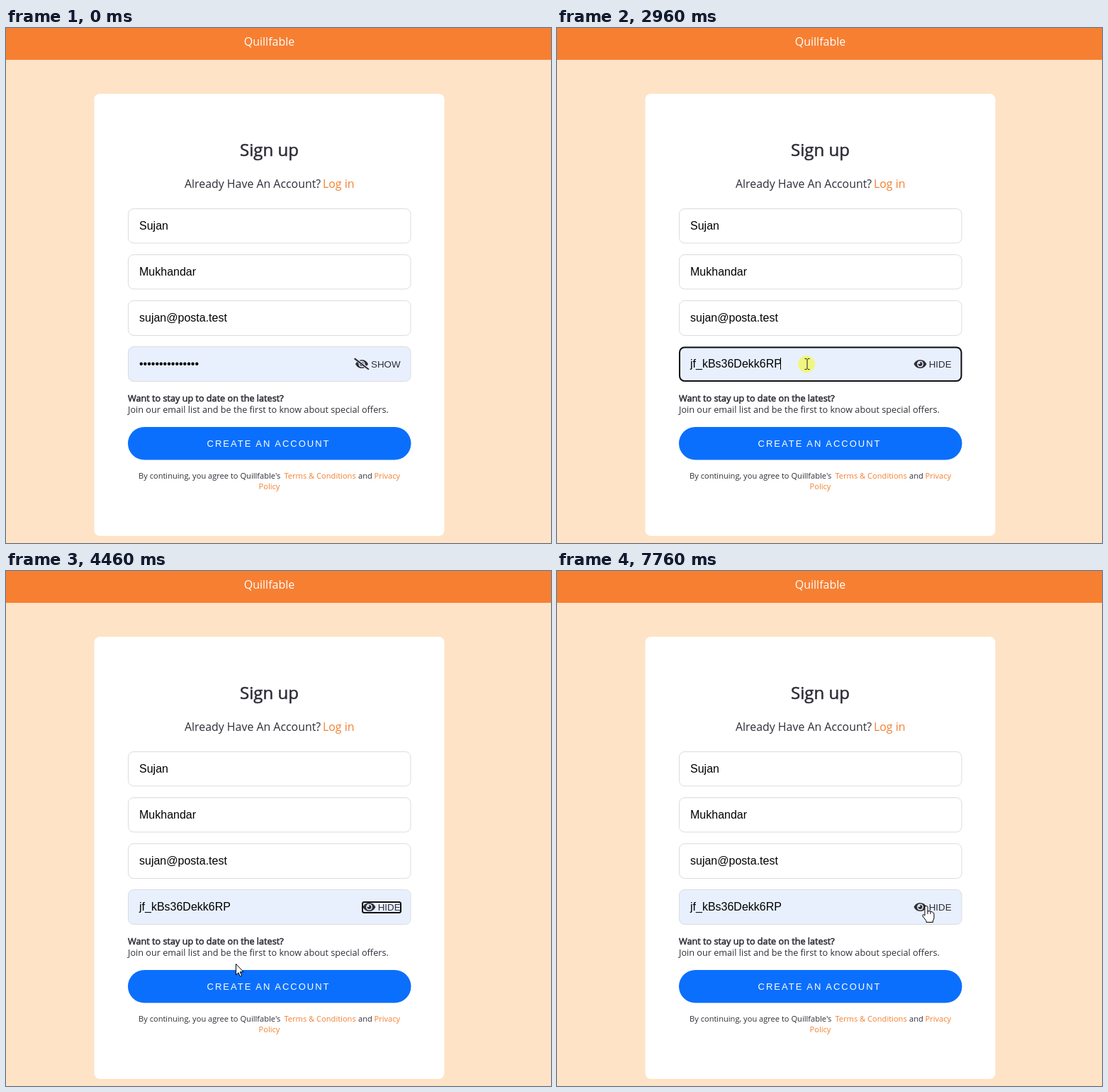
Write an HTML page that moves like this. It is 769 px wide and 728 px high and loops after 8 s.

```html
<!DOCTYPE html>
<html lang="en">
<head>
<meta charset="utf-8">
<title>Sign up</title>
<style>
  html, body { margin: 0; height: 100%; overflow: hidden; background: #fee3c6; }
  svg { display: block; width: 769px; height: 728px; font: 16px "Open Sans", sans-serif; fill: #2f2d36; }
  text { white-space: pre; }
  .mid { text-anchor: middle; }
  .ui { font-family: "Liberation Sans", Arial, sans-serif; }
  .field { fill: #fff; stroke: #dcdcdf; }
  .filled { fill: #e8f0fe; }
  .value { fill: #000; }
  .link { fill: #f28030; }
  .heavy { stroke: #2f2d36; stroke-width: .55; }
  .note { font-size: 12.67px; }
  .terms { font-size: 11.1px; }
  .toggle { font-size: 13.33px; }
  .ring { fill: none; stroke: #101014; stroke-width: 2; }
  .popup { fill: #fff; font-size: 11.1px; }
  .line { fill: none; stroke: #eee; stroke-width: 1.2; }
  .pointer { fill: #fff; stroke: #000; stroke-linejoin: round; }
</style>
</head>
<body>
<svg viewBox="0 0 769 728">
  <defs>
    <g id="eye">
      <path d="M0 8Q3 2 9 2T18 8Q15 14 9 14T0 8Z"/>
      <circle cx="9" cy="8" r="4.5" fill="#e8f0fe"/>
      <circle cx="9" cy="8" r="3"/>
      <circle cx="7.5" cy="6.5" r="1.5" fill="#e8f0fe"/>
    </g>
    <filter id="shade" x="-10%" y="-10%" width="120%" height="130%">
      <feDropShadow dx="0" dy="5" stdDeviation="5" flood-opacity=".28"/>
    </filter>
  </defs>

  <rect width="769" height="728" fill="#fee3c6"/>
  <rect width="769" height="45" fill="#f77f32"/>
  <text class="mid" x="371.5" y="24.5" fill="#fff">Quillfable</text>
  <rect x="124.5" y="93" width="494" height="625" rx="8" fill="#fff"/>

  <text class="mid heavy" x="371.5" y="181" font-size="24">Sign up</text>
  <text x="252" y="226" font-size="15.9">Already Have An Account?</text>
  <text class="link" x="447" y="226" font-size="15.9">Log in</text>

  <rect class="field" x="172.5" y="255.5" width="398.5" height="48.5" rx="7.5"/>
  <rect class="field" x="172.5" y="320.5" width="398.5" height="48.5" rx="7.5"/>
  <rect class="field" x="172.5" y="385.5" width="398.5" height="49" rx="7.5"/>
  <rect class="field filled" x="172.5" y="450.5" width="398.5" height="49" rx="7.5"/>
  <g class="ui value">
    <text x="188" y="285">Sujan</text>
    <text x="188" y="350">Mukhandar</text>
    <text x="188" y="415">sujan@posta.test</text>
    <text id="password" x="188" y="480"></text>
  </g>
  <g id="focus">
    <rect class="ring" x="173" y="451.5" width="397.5" height="47.5" rx="7"/>
    <path d="M315.5 466v17" stroke="#000"/>
  </g>

  <g id="show" class="ui toggle">
    <use href="#eye" x="493" y="467"/>
    <path d="M492 467l20 15.5" stroke="#e8f0fe" stroke-width="4"/>
    <path d="M492.3 467.6l19 14.6" stroke="#2f2d36" stroke-width="2" stroke-linecap="round"/>
    <text x="515" y="480">SHOW</text>
  </g>
  <g id="hide" class="ui toggle">
    <use href="#eye" x="503.5" y="467"/>
    <text x="524.7" y="480">HIDE</text>
  </g>
  <rect id="ring" class="ring" y="468" height="15" rx="2.5"/>

  <text class="note heavy" x="172" y="528">Want to stay up to date on the latest?</text>
  <text class="note" x="172" y="544">Join our email list and be the first to know about special offers.</text>
  <rect x="172" y="564" width="399.5" height="46.5" rx="23.2" fill="#0b6ffd"/>
  <text class="ui" x="283.6" y="592" font-size="13" letter-spacing="2" fill="#fff">CREATE AN ACCOUNT</text>
  <g class="terms">
    <text x="187" y="637">By continuing, you agree to Quillfable's</text>
    <text class="link" x="392.5" y="637">Terms &amp; Conditions</text>
    <text x="497" y="637">and</text>
    <text class="link" x="519.5" y="637">Privacy</text>
    <text class="link mid" x="371.5" y="652">Policy</text>
  </g>

  <g id="popup" class="popup">
    <rect x="173" y="501" width="397.5" height="155" rx="7" fill="#484848" filter="url(#shade)"/>
    <rect id="row" x="176" y="541" width="286" height="46" rx="3" fill="#1b5488"/>
    <path d="M187.500 522l7.500-8 7.500 8h-2v5h-11v-5z" fill="#303030"/>
    <text x="210" y="525" font-size="10.3" stroke="#fff" stroke-width=".2">Harborlit Vane generated this strong password.</text>
    <path class="line" d="M551.500 517l8.500 8.500m0-8.500l-8.500 8.500"/>
    <text x="192" y="569" font-size="15" font-weight="700">jf_kBs36Dekk6RP</text>
    <path class="line" d="M494 561a6.300 6.300 0 1 0 1.300 4M494.500 557.500v4h-4"/>
    <text x="506" y="569" font-size="13.1">Refresh</text>
    <circle cx="199" cy="613" r="9.500" fill="#3b8fc4"/>
    <text x="218.500" y="616">Your password will be saved and filled across devices. Manage</text>
    <text x="218.500" y="634">your passwords in</text>
    <text x="319" y="634" fill="#83bdf0" text-decoration="underline">settings</text>
    <text x="359" y="634">.</text>
  </g>

  <circle id="click" r="12" fill="#f3f75c" opacity=".78"/>
  <g id="cursor">
    <path id="arrow" class="pointer" d="M.5 .5V16L4 12.700 6.400 18 8.700 17 6.300 11.700H11Z"/>
    <path id="beam" fill="none" stroke="#1c1c1c" d="M-3.500-7.500h2.500l1 1 1-1h2.500M0-6.500v13M-3.500 7.500h2.500l1-1 1 1h2.500"/>
    <path id="hand" class="pointer" d="M-2 2Q-2 .5 0 .5T2 2V8Q4 7 6 8.500 8 8 9.300 9.700 11 9.800 11 12V17Q11 19 9.500 21V23.500H0V21.500L-5 15Q-5.600 12.500-3.500 12.800L-2 14ZM2 8v4M6 8.500v3.500"/>
  </g>
</svg>

<script>
const LOOP = 8000;
const SECRET = 'jf_kBs36Dekk6RP';
const $ = id => document.getElementById(id);

// Moves: start and end time, number of steps, end point, optional bend point.
const origin = [718, 695];
const moves = [
  { from: 390, to: 1150, steps: 12, end: [542, 489] },
  { from: 1220, to: 1500, steps: 5, end: [528, 477] },
  { from: 2430, to: 2830, steps: 7, end: [353, 475] },
  { from: 3440, to: 3910, steps: 8, end: [324, 555] },
  { from: 4530, to: 5020, steps: 8, end: [545, 481] },
  { from: 5080, to: 5290, steps: 4, end: [541, 472] },
  { from: 5880, to: 6010, steps: 3, end: [622, 481] },
  { from: 6730, to: 7490, steps: 12, end: [521, 473], bend: [585, 515] }
];
const clicks = [[1760, 1830], [2890, 3030], [4110, 4180], [5480, 5550], [6340, 6400], [7560, 7760]];

const within = (t, a, b) => t >= a && t < b;
const ease = p => p * p * (3 - 2 * p);
const show = (id, on) => { $(id).style.display = on ? '' : 'none'; };

function pointerAt(t) {
  let at = origin;
  for (const { from, to, steps, end, bend } of moves) {
    if (t < from) break;
    const step = Math.floor((t - from) / (to - from) * (steps - 1) + 1.001);
    const p = ease(Math.min(1, step / steps));
    const start = at;
    at = start.map((a, i) => {
      const c = bend ? bend[i] : (a + end[i]) / 2;
      return (1 - p) ** 2 * a + 2 * p * (1 - p) * c + p * p * end[i];
    });
  }
  return at;
}

function pointerShape([x, y], popupOpen, buttonLeft) {
  const over = (l, t, r, b) => within(x, l, r) && within(y, t, b);
  if (popupOpen && over(173, 501, 571, 656)) return 'arrow';
  if (over(buttonLeft, 467, 558, 484)) return 'hand';
  if (over(172, 451, 571, 500) || over(172, 516, 540, 547)) return 'beam';
  return 'arrow';
}

function draw(t) {
  const revealed = within(t, 1830, 5550) || t >= 7690;
  const buttonLeft = revealed ? 503 : 491;
  const point = pointerAt(t);
  const popupOpen = within(t, 3030, 4430);

  $('password').textContent = revealed ? SECRET : '•'.repeat(SECRET.length);
  show('show', !revealed);
  show('hide', revealed);
  show('focus', within(t, 2890, 4250));
  show('ring', within(t, 4250, 6340));
  $('ring').setAttribute('x', buttonLeft);
  $('ring').setAttribute('width', 557 - buttonLeft);

  show('popup', popupOpen);
  $('popup').setAttribute('opacity', Math.min(1, Math.max(0, (4430 - t) / 220)));
  show('row', popupOpen && point[1] > 541);

  const place = `translate(${point.map(Math.round)})`;
  const shape = pointerShape(point, popupOpen, buttonLeft);
  show('cursor', t >= 390);
  $('cursor').setAttribute('transform', place);
  for (const id of ['arrow', 'beam', 'hand']) show(id, id === shape);
  show('click', clicks.some(([a, b]) => within(t, a, b)));
  $('click').setAttribute('transform', place + ' translate(-1 0)');
}

const began = performance.now();
function tick() {
  draw((performance.now() - began) % LOOP);
  requestAnimationFrame(tick);
}
tick();
</script>
</body>
</html>
```
